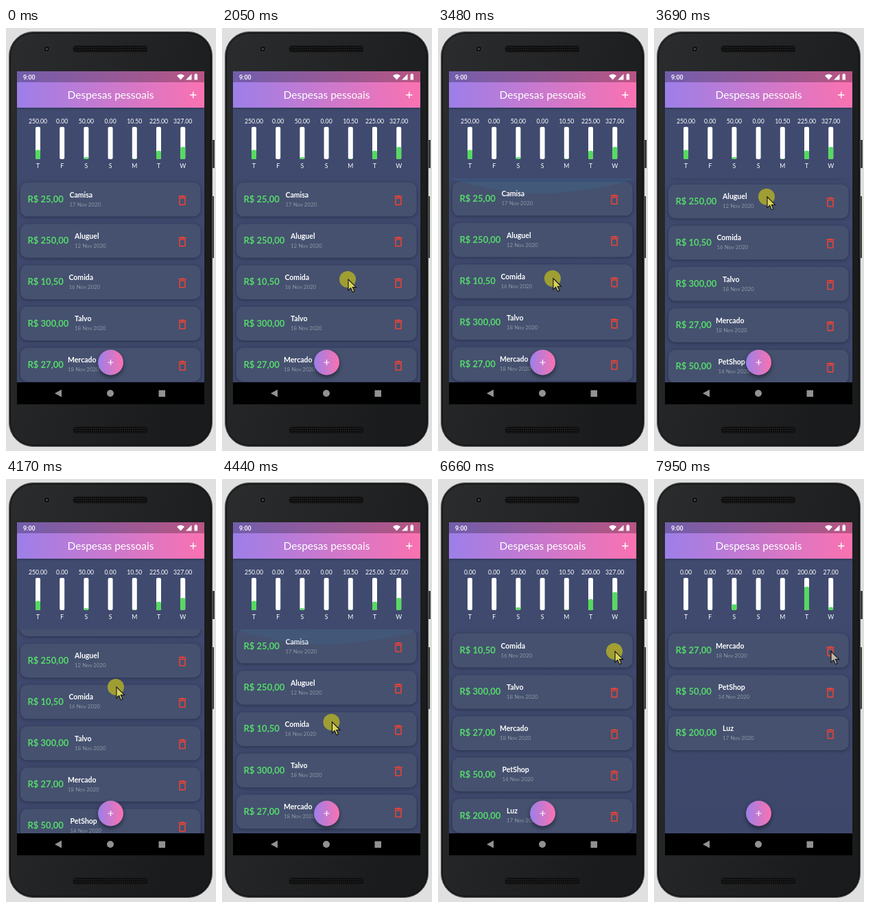
Write an HTML page that moves like this. It is 306 by 616 pixels and loops after 8000 ms.

```html
<!DOCTYPE html>
<html lang="pt">
<head>
<meta charset="utf-8">
<style>
  html, body { margin: 0; width: 100%; height: 100%; overflow: hidden; background: #e0e0e0; }
  svg { display: block; width: 306px; height: 616px; font-family: Lato, "Open Sans", sans-serif; }
  .card { fill: #45516f; filter: drop-shadow(0 1px 2.5px #1d2338b0); }
  .price { font-size: 13px; font-weight: 700; fill: #55da6b; }
  .name { font-size: 10.5px; font-weight: 700; fill: #fff; }
  .date { font-size: 7.9px; fill: #8f96a5; }
  .bars { font-size: 8.7px; fill: #fff; text-anchor: middle; }
  .bars .fill { fill: #55da60; }
</style>
</head>
<body>
<svg viewBox="0 0 306 616">
  <defs>
    <linearGradient id="brand"><stop stop-color="#9c7fe9"/><stop offset="1" stop-color="#fa72b1"/></linearGradient>
    <linearGradient id="status"><stop stop-color="#725eac"/><stop offset="1" stop-color="#b85583"/></linearGradient>
    <linearGradient id="body" x2="1" y2=".5"><stop stop-color="#2b2c2d"/><stop offset=".6" stop-color="#212223"/><stop offset="1" stop-color="#1a1b1c"/></linearGradient>
    <linearGradient id="page" x2="0" y2="1"><stop stop-color="#414b70"/><stop offset="1" stop-color="#3d476a"/></linearGradient>
    <clipPath id="view"><path d="M16 219H289V516H16z"/></clipPath>
    <clipPath id="screen"><path d="M16 63H289V548H16z"/></clipPath>
    <pattern id="mesh" width="3" height="3" patternUnits="userSpaceOnUse"><path fill="#0c0c0c" d="M0 0h3v3H0z"/><circle cx="1.5" cy="1.5" r=".8" fill="#303030"/></pattern>
    <path id="trash" fill="#ea4338" fill-rule="evenodd" transform="translate(247.4 241.4) scale(.8)"
      d="M6 19a2 2 0 0 0 2 2h8a2 2 0 0 0 2-2V7H6zM8 9h8v10H8zM15.500 4l-1-1h-5l-1 1H5v2h14V4z"/>
  </defs>

  <!-- phone -->
  <path fill="#3b3c3d" d="M299 163h5v41h-5zM299 245h4v90h-4z"/>
  <rect x="4.500" y="5.500" width="296" height="604" rx="35" fill="url(#body)" stroke="#58595a"/>
  <rect x="6.500" y="7.500" width="292" height="600" rx="33" fill="none" stroke="#111"/>
  <circle cx="59.500" cy="30.500" r="4.500" fill="#111" stroke="#3a3b3c"/>
  <circle cx="59.500" cy="30.500" r="1.700" fill="#39404b"/>
  <rect x="98" y="26" width="108" height="9" rx="4" fill="url(#mesh)" stroke="#141414"/>
  <rect x="98" y="581" width="108" height="9" rx="4" fill="url(#mesh)" stroke="#141414"/>

  <g clip-path="url(#screen)">
    <path fill="url(#page)" d="M16 63h273v485H16z"/>
    <g clip-path="url(#view)">
      <g id="list"></g>
      <path id="glow" fill="#3e6b95" d="M16 219H289Q152 262 16 219"/>
    </g>
    <g class="bars" id="bars"></g>
    <path fill="url(#brand)" d="M16 79h273v37H16z" style="filter:drop-shadow(0 1.5px 2px #1a203888)"/>
    <path fill="url(#status)" d="M16 63h273v16H16z"/>
    <g fill="#fff">
      <text x="25" y="74.500" font-size="9" font-weight="500" font-family="Roboto, sans-serif">9:00</text>
      <path d="M249 69.500Q254.500 65 260 69.500L254.500 75.500zM262 75.500h8.500v-8.500zM274.500 67.500h1.200v-1h2v1h1.300v8h-4.500z"/>
      <text x="152.500" y="103" font-size="15.500" text-anchor="middle">Despesas pessoais</text>
    </g>
    <path d="M268 97.500h9.500M272.750 92.750v9.500" stroke="#fff" stroke-width="1.400"/>
    <circle cx="152.500" cy="487" r="18.500" fill="url(#brand)" style="filter:drop-shadow(0 3px 3px #0007)"/>
    <path d="M148.500 487h8M152.500 483v8" stroke="#fff" stroke-width="1.200"/>
    <path d="M16 516h273v32H16z"/>
    <path fill="#929292" d="M71 532l10-5.500v11zM222.500 527.500h9.500v9.500h-9.500z"/>
    <circle cx="152" cy="532" r="5" fill="#929292"/>
  </g>

  <g id="mouse">
    <circle id="press" cx="-1" r="12" fill="#a7a52f" opacity=".92"/>
    <path id="arrow" stroke="#111" stroke-width="1.100" d="M0 0V16L3.700 12.600 6.400 18.800 9 17.600 6.400 11.600H11.500z"/>
  </g>
</svg>
<script>
const $ = id => document.getElementById(id);
const LOOP = 8000, TOP = 225, PITCH = 60.2;

// amount, name, day of November, x of the name
const expenses = [
  [25, 'Camisa', 17, 92.5], [250, 'Aluguel', 12, 100], [10.5, 'Comida', 16, 91.5],
  [300, 'Talvo', 18, 100], [27, 'Mercado', 18, 90], [50, 'PetShop', 14, 93.5], [200, 'Luz', 17, 100]
];
const removals = [5450, 6230, 6810, 7450];
const presses = [[1990, 4930], [5310, 5390], [6080, 6160], [6660, 6740], [7300, 7380], [7870, 7950]];

// time, x, y of the pointer tip
const pointer = [
  [690, 0, 561], [890, 306, 534], [1130, 306, 409], [1500, 200, 408], [1720, 168, 398], [1930, 184, 366],
  [2050, 184, 366], [2900, 172, 295], [3440, 168, 369], [3880, 163, 167], [4350, 160, 366],
  [4640, 162, 312], [4930, 164, 364], [5060, 274, 285], [5140, 259, 251], [5600, 259, 251], [5800, 258, 251]
];
const scroll = [
  [2070, 0], [2920, 64], [3420, 0], [3450, 0], [3950, 122], [4330, 0], [4370, 0], [4670, 45], [4960, 0]
];
const glow = [[3340, 0], [3420, .35], [3480, .3], [3700, 0], [4300, 0], [4360, .35], [4560, 0]];

// eased values between timed keys
function at(keys, t) {
  const next = keys.findIndex(k => k[0] > t);
  if (next < 1) return (next ? keys[keys.length - 1] : keys[0]).slice(1);
  const a = keys[next - 1], b = keys[next];
  const e = (1 - Math.cos(Math.PI * (t - a[0]) / (b[0] - a[0]))) / 2;
  return a.slice(1).map((v, i) => v + (b[i + 1] - v) * e);
}
const inside = (spans, t) => spans.some(([a, b]) => t >= a && t < b);

$('list').innerHTML = expenses.map(([amount, name, day, x]) => `<g>
  <rect class="card" x="21" y="225" width="262.500" height="49.500" rx="10"/>
  <text class="price" x="31.500" y="254">R$ ${amount.toFixed(2).replace('.', ',')}</text>
  <text class="name" x="${x}" y="246.500">${name}</text>
  <text class="date" x="${x}" y="259.500">${day} Nov 2020</text>
  <use href="#trash"/></g>`).join('');

$('bars').innerHTML = [...'TFSSMTW'].map((d, i) => `<g transform="translate(${46.5 + i * 35.2})">
  <text class="sum" y="138.500"></text>
  <rect x="-3.500" y="144" width="7" height="47" rx="2"/>
  <rect class="fill" x="-3.500" width="7" rx="2"/>
  <text y="204">${d}</text></g>`).join('');

const rows = [...$('list').children], bars = [...$('bars').children];
let shown = -1;

function update(removed) {
  shown = removed;
  rows.forEach((row, i) => {
    row.style.display = i < removed ? 'none' : '';
    row.setAttribute('transform', `translate(0 ${(i - removed) * PITCH})`);
  });
  const left = expenses.slice(removed);
  const sum = list => list.reduce((s, e) => s + e[0], 0);
  bars.forEach((bar, i) => {
    const spent = sum(left.filter(e => e[2] === 12 + i));
    const h = 47 * spent / sum(left);
    const fill = bar.querySelector('.fill');
    bar.querySelector('.sum').textContent = spent.toFixed(2);
    fill.setAttribute('y', 191 - h);
    fill.setAttribute('height', h);
  });
}

const start = performance.now();
function frame() {
  const t = (performance.now() - start) % LOOP;
  const removed = removals.filter(r => r <= t).length;
  if (removed !== shown) update(removed);
  $('list').setAttribute('transform', `translate(0 ${-at(scroll, t)[0]})`);
  $('glow').setAttribute('opacity', at(glow, t)[0]);

  const pressed = inside(presses, t);
  $('mouse').setAttribute('transform', `translate(${at(pointer, t).join(' ')})`);
  $('mouse').style.display = t < 700 || inside([[880, 1140]], t) ? 'none' : '';
  $('press').style.display = pressed ? '' : 'none';
  $('arrow').setAttribute('fill', pressed ? '#d6d25c' : '#bdb5a6');
  requestAnimationFrame(frame);
}
frame();
</script>
</body>
</html>
```
